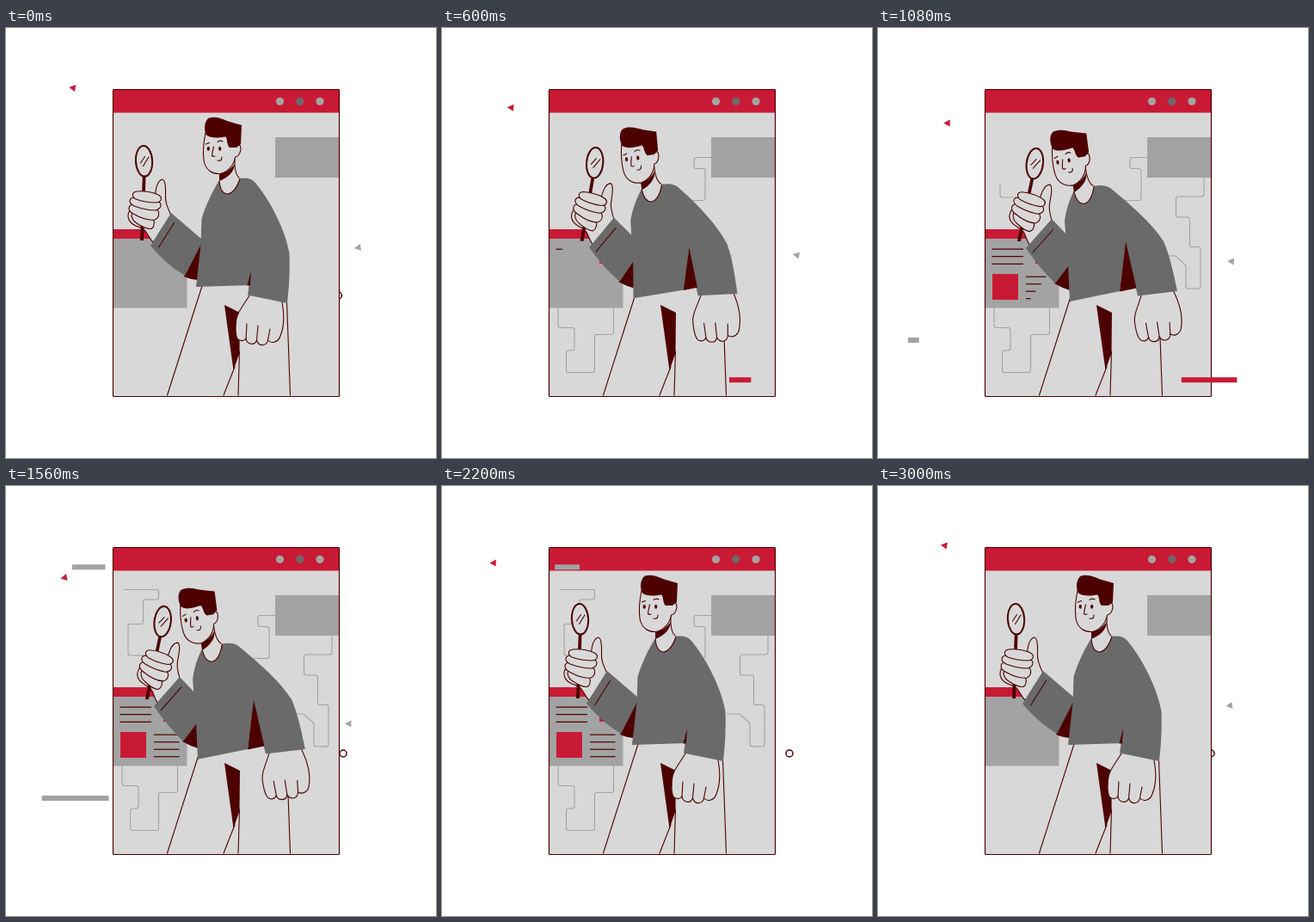
An HTML page that plays this animation: 500x500 px, repeating every 3.04 s.

```html
<!DOCTYPE html>
<html lang="en">
<head>
<meta charset="utf-8">
<title>Searching a page</title>
<style>
  html, body { margin: 0; width: 100%; height: 100%; overflow: hidden; background: #fff; }
  svg { display: block; width: 100%; height: 100%; }
  .red { fill: #c91a35; }
  .mid { fill: #a3a3a3; }
  .grey { fill: #6a6a6a; }
  .light { fill: #d8d8d8; }
  .dark { fill: #4d0000; }
  .ink { stroke: #4d0000; stroke-width: 1.1; stroke-linejoin: round; stroke-linecap: round; }
  .line { fill: none; }
  .wire { fill: none; stroke: #a3a3a3; stroke-width: 1.1; }
  .text { fill: none; stroke: #4d0000; stroke-width: 1.2; }
</style>
</head>
<body>
<svg viewBox="0 0 500 500">
  <path id="redChip" class="red" d="M-4.5 1.5 2 -4 3.5 4Z"/>
  <path id="greyChip" class="mid" d="M-4.5 1 2.5 -4 3.5 4Z"/>
  <circle id="ring" r="4" cy="311" fill="none" stroke="#4d0000" stroke-width="1.5"/>

  <rect class="light" x="124.5" y="71.5" width="263" height="357"/>
  <rect class="red" x="124.5" y="71.5" width="263" height="27"/>
  <circle class="mid" cx="318.5" cy="85.3" r="4.6"/>
  <circle class="grey" cx="341.7" cy="85.3" r="4.6"/>
  <circle class="mid" cx="365" cy="85.3" r="4.6"/>

  <g id="wires"></g>
  <rect class="mid" x="313" y="127" width="74" height="47"/>
  <rect class="mid" x="124.5" y="245" width="86" height="80.5"/>
  <rect class="red" x="124.5" y="234" width="86" height="11"/>
  <g id="texts"></g>
  <rect id="tag" class="red"/>
  <rect id="photo" class="red"/>
  <rect x="124.5" y="71.5" width="263" height="357" rx="1" fill="none" stroke="#4d0000" stroke-width="1.2"/>

  <path class="light" d="M228 300 187.500 427H253L266 394 271 378 270 427H330.5L326.5 318Z"/>
  <path class="dark" d="M254 322 272 331 271.5 378 264.5 398Z"/>
  <path class="ink line" d="M228 300 187.500 427M266 394 253 427M271.5 376 270 427M326.5 318 330.5 427"/>

  <g id="hand">
    <path class="light ink" d="M144 211C141 217 141.500 223 146 227 152 232 158 231 162 236 166 241 167 246 172 250L192 218C187 207 185 202 185.500 194 186 185 185 176 181.500 176 175 178 174 189 173 197L150 200Z"/>
    <path class="dark" d="M158.800 172H162.500L160 247H156Z"/>
    <g class="light ink">
      <path d="M148 213C144 218 147 224 152 227 158 231 165 234 169 233.500 173 231 173 225 171 222Z"/>
      <path d="M147 205C141 207 142 213 148 216 155 220 165 224 173 223 179 220 179 213 174 210Z"/>
      <path d="M148 197C142 199 143 204 149 207 157 210 166 212 174 212 181 210 182 204 176 201Z"/>
      <path d="M152 190C146 191 146 196 151 199 159 202 168 203 175 203 181 202 182 197 178 194.500 172 191 160 189 152 190Z"/>
    </g>
    <g transform="rotate(-3 160.500 154.500)">
      <ellipse class="light" cx="160.500" cy="154.800" rx="9.600" ry="17.800" stroke="#4d0000" stroke-width="2"/>
    </g>
    <path class="ink line" d="M156.500 157 161.500 149.500M159.500 160.500 166 150"/>
  </g>

  <path id="elbow" class="dark"/>
  <path id="sleeve" class="grey"/>
  <path id="cuff" class="ink line"/>
  <g id="fist">
    <path class="light ink" d="M286 306C277 322 268 331 267.500 341 267 349 266 356 269 361 272 365 277 364 279 361 280 368 289 370 291.500 363 294 371 303 370 304.500 363 309 368 317 365 319 358 324 346 324 332 320 314"/>
    <path class="ink line" d="M280 344 279 362M293 346 291.500 363M307 350 304.500 363"/>
  </g>
  <path id="torso" class="grey"/>
  <path id="gap" class="dark"/>

  <g id="head">
    <path class="light" d="M247.500 168 248 179C249 188 253 193 258 193 264 192 269 184 272 175L266.500 174 266 148Z"/>
    <path class="ink line" d="M248 178C249 188 253 193 258 193 264 192 269 184 272 175"/>
    <path class="ink line" d="M266 150V160Q267 171 271 174"/>
    <path class="dark" d="M248 169.500Q259 168 266 158 265 171 248 178Z"/>
    <path class="light ink" d="M232 122C229 136 229 146 230 154 232 166 241 170 249 169.500 258 167 265 160 266.500 150 272 149 274 141 272.500 137L268 134 258 120Z"/>
    <path class="dark" d="M232.500 124C230 118 230.500 108 236 104.500 246 102 253 107 260 109L274 113 273 135 268 139 260 139C256 135 258 128 255 126.500 248 127.500 238 129 232.500 124Z"/>
    <ellipse class="dark" cx="235.300" cy="140.300" rx="1.600" ry="2.500"/>
    <ellipse class="dark" cx="248.700" cy="140.300" rx="1.600" ry="2.500"/>
    <path class="ink line" d="M232.500 135 236.500 133.500M246 132.500Q249 130 252 132M241.500 138Q240 144 239.500 148.500 241 150 243 149M246 154Q251 155.500 251 150"/>
  </g>
  <g id="bars"></g>
</svg>
<script>
const LOOP = 3040;
const $ = id => document.getElementById(id);
const set = (el, attrs) => { for (const k in attrs) el.setAttribute(k, attrs[k]); };
const add = (parent, tag, attrs) => {
  const el = document.createElementNS("http://www.w3.org/2000/svg", tag);
  set(el, attrs);
  return parent.appendChild(el);
};
const mix = (a, b, p) => a + (b - a) * p;
const ease = (t, from, to) => {
  const x = Math.min(1, Math.max(0, (t - from) / (to - from)));
  return x * x * (3 - 2 * x);
};

// Smooth periodic curve through [time, ...values] keys
function follow(keys, t) {
  const n = keys.length;
  const key = i => {
    const turn = Math.floor(i / n), k = keys[i - turn * n];
    return [k[0] + turn * LOOP, ...k.slice(1)];
  };
  let i = n - 1;
  while (keys[i][0] > t) i--;
  const [a, b, c, d] = [-1, 0, 1, 2].map(o => key(i + o));
  const h = c[0] - b[0], s = (t - b[0]) / h;
  return b.slice(1).map((v, j) => {
    const k = j + 1;
    const m0 = (c[k] - a[k]) / (c[0] - a[0]) * h, m1 = (d[k] - b[k]) / (d[0] - b[0]) * h;
    return v + s * m0 + s * s * (3 * (c[k] - v) - 2 * m0 - m1) + s * s * s * (2 * (v - c[k]) + m0 + m1);
  });
}

// Upright and leaning outlines
const morphs = {
  elbow: ["M227 250L207 289Q216 293 225 293Z", "M222 274L205 297Q215 303 226 306Z"],
  sleeve: ["M192 215L228 246L226 253L208 288Q185 274 168 253Z", "M202 222L221 242L222 276L206 297Q186 277 172 256Z"],
  cuff: ["M195.500 226.500L177.500 255", "M204 234L180 261"],
  torso: ["M248 177C241 188 232 206 227.500 222L226.500 252L221 301L284 299L285 283L281 310.500L327 320C330 295 330 275 329.500 262C325 235 307 200 290 180Q284 173 271 175Q259 208 248 177Z",
          "M228 189C223 199 218.500 211 217 225L221 275L223 318L281 306L288 250L302 311.500L348 306C343 282 339 264 332 248C318 226 293 205 270 186Q262 181 250 184Q239 219 228 189Z"],
  gap: ["M285 282L280.500 299.500L284 299.500Z", "M288 248L281 306.500L300.500 302.500Z"]
};
const lerpPath = ([a, b], p) => {
  const goal = b.match(/[\d.]+/g);
  let i = 0;
  return a.replace(/[\d.]+/g, v => mix(+v, +goal[i++], p).toFixed(2));
};

// Rigid parts: pivot, shift and turn when leaning
const rigid = {
  hand: [158, 246, 6, 1, 10],
  head: [241.75, 140, -26.5, 14.8, -10],
  fist: [293, 346, 31.5, -4, -14]
};

const strokes = [];
const stroke = (group, cls, d, from, to, outFrom, outTo) =>
  strokes.push({ el: add($(group), "path", { class: cls, d, pathLength: 1 }), from, to, outFrom, outTo });

stroke("wires", "wire", "M135 325V346Q135 348.500 138 348.500H151Q154 348.500 154 351V372Q154 375 151 375H147Q144.500 375 144.500 378V398Q144.500 400.500 147 400.500H175Q177.500 400.500 177.500 398V359Q177.500 356.500 180 356.500H197Q199.500 356.500 199.500 354V325", 60, 570, 2300, 2800);
stroke("wires", "wire", "M313 150.500H296Q293 150.500 293 153V161Q293 163.500 296 163.500H303Q306 163.500 306 166V198Q306 200.500 303 200.500H285", 60, 570, 2300, 2800);
stroke("wires", "wire", "M331 265H346L358 276V300Q358 303 361 303H373Q375 303 375 300V257Q375 254.500 372 254.500H365Q362.500 254.500 362.500 252V223Q362.500 220 360 220H349Q346.500 220 346.500 217V199Q346.500 196 349 196H376Q379 196 379 193V174", 550, 1060, 2300, 2800);
stroke("wires", "wire", "M161 197H145Q142 197 142 194V163Q142 160.500 145 160.500H157Q159.500 160.500 159.500 158V135Q159.500 132 162 132H175Q177.500 132 177.500 129V123Q177.500 120.500 175 120.500H137", 920, 1470, 2300, 2800);
[257.2, 265.7, 274.3].forEach((y, i) => stroke("texts", "text", `M132.500 ${y}H169`, 485 + i * 110, 885 + i * 90, 2300, 2650));
[289.2, 297.7, 306.2, 314.7].forEach((y, i) => stroke("texts", "text", `M172 ${y}H201.500`, 795 + i * 58, 1195 + i * 58, 2300, 2650));

// Sliding bars: extent, top, then times of the head and the tail
const bars = [
  { cls: "red", x: [334, 419], y: 406.2, head: [290, 1150], tail: [880, 1540] },
  { cls: "mid", x: [35, 121], y: 360, head: [910, 1616], tail: [1438, 2156] },
  { cls: "mid", x: [77, 160], y: 91.3, head: [1235, 1920], tail: [1741, 2503] }
].map(b => ({ ...b, el: add($("bars"), "rect", { class: b.cls, y: b.y, height: 6 }) }));

// Keys: time, x, y, turn
const chips = {
  redChip: [[0, 78, 69, 20], [600, 80.5, 92, 15], [1080, 81, 110, 12], [1560, 68, 106, 0], [1840, 61.5, 100, 0], [2200, 60, 89, 12], [2800, 74, 73, 20]],
  greyChip: [[0, 409.5, 255, 0], [600, 412.5, 263.5, 22], [1080, 411, 271, 12], [1560, 398.5, 276, 8], [1840, 389, 278, 15], [2200, 381, 272, 10], [2800, 403.5, 258, 0]]
};
const ringPath = [[0, 386.5], [600, 375], [1080, 375], [1560, 392], [1840, 407], [2000, 410.5], [2200, 404], [2600, 392]];

function grow(el, x, y, w, h, p) {
  set(el, { x: x + w * (1 - p) / 2, y: y + h * (1 - p) / 2, width: w * p, height: h * p });
}

function draw(t) {
  const lean = ease(t, 250, 750) - ease(t, 1535, 2035);
  for (const id in morphs) set($(id), { d: lerpPath(morphs[id], lean) });
  for (const id in rigid) {
    const [x, y, dx, dy, turn] = rigid[id];
    set($(id), { transform: `translate(${dx * lean} ${dy * lean}) rotate(${turn * lean} ${x} ${y})` });
  }
  for (const s of strokes) {
    const p = ease(t, s.from, s.to) - ease(t, s.outFrom, s.outTo);
    set(s.el, { "stroke-dasharray": `${p} 2`, visibility: p > 0.001 ? "visible" : "hidden" });
  }
  for (const b of bars) {
    const left = mix(...b.x, ease(t, ...b.tail)), right = mix(...b.x, ease(t, ...b.head));
    set(b.el, { x: left, width: Math.max(0, right - left) });
  }
  const out = ease(t, 2300, 2700);
  grow($("tag"), 183, 257, 17, 17, ease(t, 250, 590) - out);
  grow($("photo"), 133, 286, 30, 30, ease(t, 620, 1020) - out);
  for (const id in chips) {
    const [x, y, turn] = follow(chips[id], t);
    set($(id), { transform: `translate(${x} ${y}) rotate(${turn})` });
  }
  set($("ring"), { cx: follow(ringPath, t)[0] });
}

const start = performance.now();
function tick() {
  draw((performance.now() - start) % LOOP);
  requestAnimationFrame(tick);
}
tick();
</script>
</body>
</html>
```
